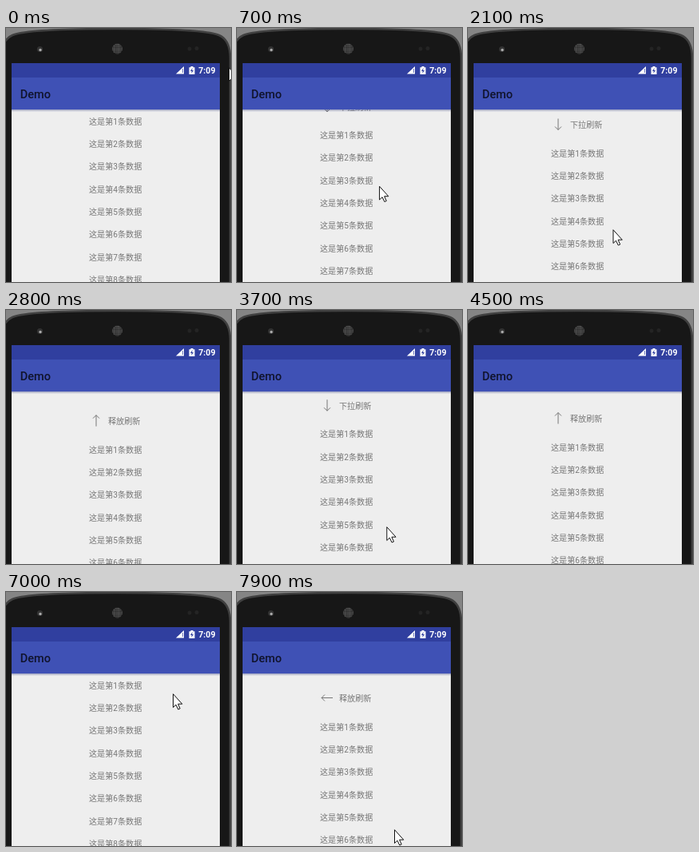
Animation of 282x318 px, one loop 8 s. Source, as an HTML page:

```html
<!DOCTYPE html>
<html lang="zh">
<head>
<meta charset="utf-8">
<title>Pull to refresh</title>
<style>
  html, body { margin: 0; width: 100%; height: 100%; overflow: hidden; background: #858585; }
  svg { display: block; width: 282px; height: 318px; }
  text { font: 10.1px Roboto, "Noto Sans CJK SC", "Noto Sans CJK", sans-serif; fill: #777; }
  .title { font-size: 14.6px; font-weight: 500; fill: #10132c; }
  .clock { font-size: 10.6px; font-weight: 700; fill: #fff; }
</style>
</head>
<body>
<svg viewBox="0 0 282 318">
  <defs>
    <clipPath id="content"><rect x="7" y="102" width="261" height="216"/></clipPath>
    <pattern id="mesh" width="2.4" height="2.4" patternUnits="userSpaceOnUse">
      <rect width="2.4" height="2.4" fill="#222"/>
      <circle cx="1.2" cy="1.2" r=".8" fill="#777"/>
    </pattern>
    <linearGradient id="shadow" x2="0" y2="1">
      <stop stop-color="#4a5490" stop-opacity=".5"/>
      <stop offset="1" stop-color="#4a5490" stop-opacity="0"/>
    </linearGradient>
  </defs>

  <!-- Phone -->
  <path d="M-6 340V38Q-6 15 8 9C22 3 70 1 138 1S253 3 267 9Q281 15 281 38V340Z" fill="#171717" stroke="#404040" stroke-width="2.5"/>
  <circle cx="42.5" cy="26.5" r="3.6" fill="#333"/>
  <circle cx="43" cy="27.5" r="1.7" fill="#aaa"/>
  <circle cx="139.5" cy="26" r="6.5" fill="url(#mesh)"/>
  <g fill="#242424"><circle cx="230" cy="26" r="2.5"/><circle cx="239" cy="25.5" r="2.5"/></g>
  <rect x="7" y="44" width="261" height="274" fill="#eee"/>

  <g clip-path="url(#content)">
    <g id="list">
      <g id="arrow"><path d="M0-7V7M-4 3L0 7L4 3" fill="none" stroke="#777"/></g>
      <text id="hint" x="128" y="85.3"></text>
    </g>
  </g>

  <!-- App and status bars -->
  <rect x="7" y="102" width="261" height="3" fill="url(#shadow)"/>
  <rect x="7" y="62" width="261" height="40" fill="#3f51b5"/>
  <rect x="7" y="44" width="261" height="18" fill="#303f9f"/>
  <text class="title" x="17.7" y="88">Demo</text>
  <text class="clock" x="241.3" y="57">7:09</text>
  <path d="M213 57.5L223 48V57.5Z" fill="#fff"/>
  <path d="M221.5 51V56" stroke="#303f9f" stroke-opacity=".7"/>
  <path d="M229.5 49.3H231.5V48H234.5V49.3H236.5V58H229.5Z" fill="#fff"/>
  <path d="M233.6 50L231 54H232.8L232.3 57L235 53H233.2Z" fill="#303f9f"/>

  <path id="cursor" d="M.5-.3V16.5L4 13.2L6.8 19L9.2 18L6.6 12.2H11.8Z" fill="#fff" stroke="#111"/>
</svg>
<script>
const LOOP = 8000, STEP = 100, ROW = 28.3, THRESHOLD = 51;
const $ = id => document.getElementById(id);
const ease = p => (1 - Math.cos(Math.PI * p)) / 2;
const mix = (a, b, p) => a + (b - a) * p;

// Each move eases the cursor and the list's pull from wherever they were.
const moves = [];
const move = (start, end, x, y, pull) => moves.push({ start, end, x, y, pull });

move(-1, 0, 279, 50, 0);
move(0, 200, 179, 155, 0);
move(400, 1200, 176, 296, 56.5);
// Without letting go, the hand rocks around the threshold and drifts right.
for (let k = 0; k < 3; k++) {
  const up = 1500 + 1650 * k, down = 2300 + 1650 * k, x = 181.5 + 5.8 * k;
  move(up, up + 550, x, 253 + 19 * k, 40 - 1.25 * k);
  if (k < 2) move(down, down + 550, x + 2.5, 322 + 14 * k, 58.5 - 3.5 * k);
}
// Release, wander off, then pull again.
move(5400, 5500, 193, 291, 0.5);
move(5600, 5800, 268, 195, 0);
move(5800, 6100, 209, 128, 0);
move(7000, 7900, 197, 298, 52);

function stateAt(time) {
  let state = moves[0];
  for (const { start, end, x, y, pull } of moves) {
    if (time <= start) break;
    const p = ease(Math.min(1, (time - start) / (end - start)));
    state = { x: mix(state.x, x, p), y: mix(state.y, y, p), pull: mix(state.pull, pull, p) };
  }
  return state;
}

const isArmed = time => stateAt(time).pull > THRESHOLD;

for (let i = 0; i < 8; i++) {
  const row = document.createElementNS("http://www.w3.org/2000/svg", "text");
  row.setAttribute("x", 104);
  row.setAttribute("y", 120.7 + i * ROW);
  row.textContent = `这是第${i + 1}条数据`;
  $("list").append(row);
}

function render(now) {
  const time = Math.floor(now % LOOP / STEP) * STEP;
  const { x, y, pull } = stateAt(time);
  // The arrow makes its half turn in two steps.
  const angle = 90 * (isArmed(time) + isArmed(time - STEP));
  $("list").setAttribute("transform", `translate(0 ${pull})`);
  $("arrow").setAttribute("transform", `translate(113 80.5) rotate(${angle})`);
  $("hint").textContent = isArmed(time) ? "释放刷新" : "下拉刷新";
  $("cursor").setAttribute("transform", `translate(${x} ${y})`);
  requestAnimationFrame(render);
}
render(0);
</script>
</body>
</html>
```
